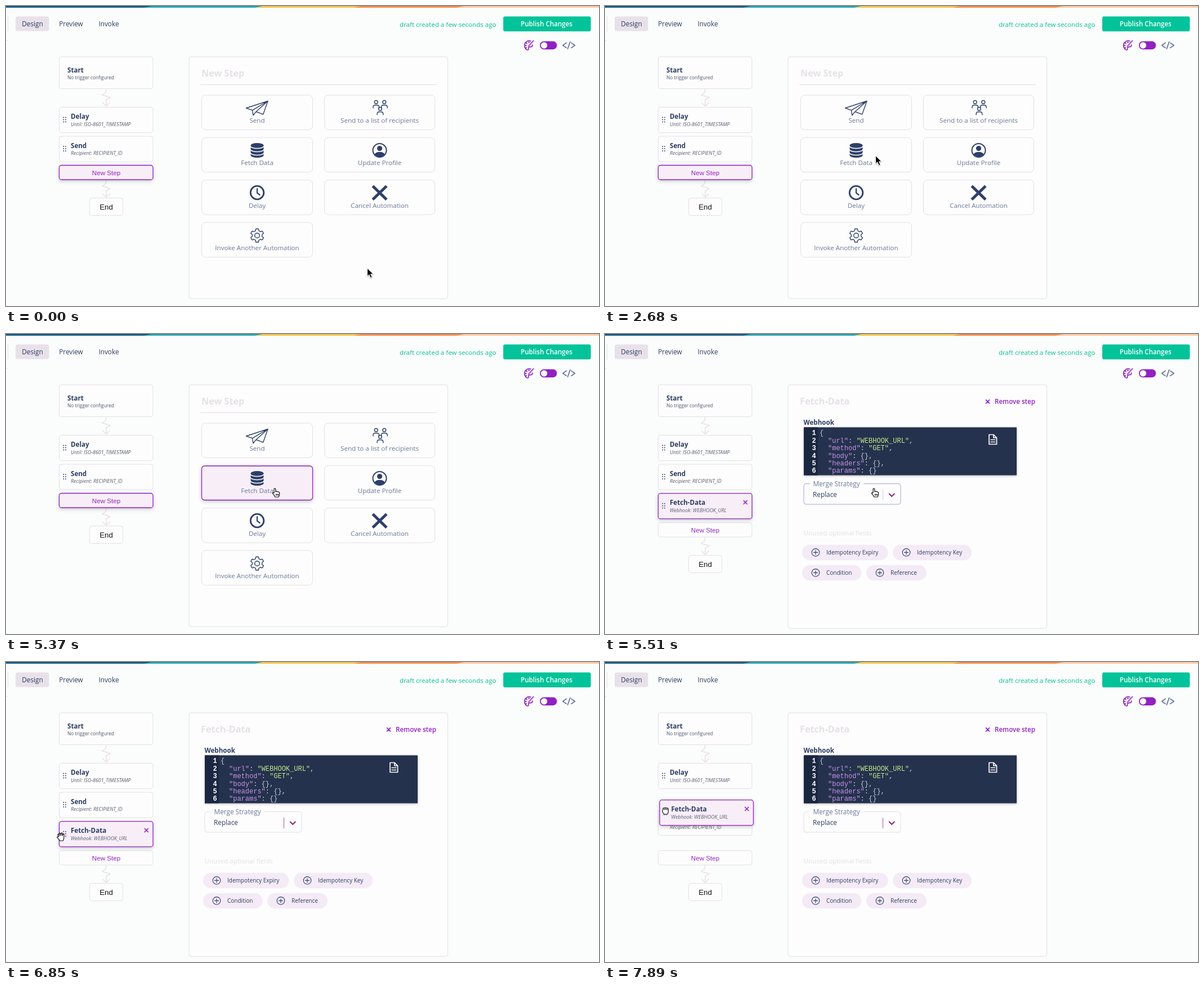
Animation, 1053 px wide and 532 px high, one loop 8000 ms. Source, as an HTML page:

```html
<!DOCTYPE html>
<html lang="en">
<head>
<meta charset="utf-8">
<title>Automation designer</title>
<style>
  html, body { margin: 0; width: 100%; height: 100%; overflow: hidden; background: #fbfdfc; }
  svg { display: block; width: 100%; height: 100%; }
  text { font: 11.6px "Open Sans", sans-serif; fill: #6b7898; white-space: pre; }
  .mid { text-anchor: middle; }
  .dark { fill: #2c3b60; }
  .tab { font-size: 11.8px; fill: #2c3b60; }
  .name { font-weight: 700; fill: #2c3b60; }
  .sub { font-size: 8.3px; fill: #4d5468; }
  .param { font-size: 8.9px; font-style: italic; fill: #5a5f70; }
  .title { font-size: 16.2px; font-weight: 700; fill: #e6e1e7; }
  .step { font-family: "Liberation Sans", sans-serif; fill: #9121c2; }
  .end { font: 13.3px "Liberation Sans", sans-serif; fill: #111; }
  .chip { font-size: 10px; fill: #2c3b60; }
  .code { font: 12px "Liberation Mono", monospace; fill: #c5cbdb; }
  .num { font-weight: 700; fill: #fff; text-anchor: end; }
  .key { fill: #c792ea; }
  .str { fill: #c3e88d; }
  .box { fill: #fdfdfd; stroke: #e2dfe4; }
  .active { fill: #f8eef8; stroke: #9121c2; stroke-width: 1.3; filter: drop-shadow(0 2px 3px #0003); }
  .line { fill: none; stroke: #2e3f69; stroke-width: 1.4; stroke-linejoin: round; stroke-linecap: round; }
  .solid { fill: #2e3f69; }
  .purple { fill: none; stroke: #9121c2; stroke-width: 1.7; stroke-linecap: round; }
  .pale { fill: none; stroke: #e9e0e7; stroke-width: 1.5; }
  .hand { fill: #fff; stroke: #111; stroke-width: 1.2; stroke-linejoin: round; }
</style>
</head>
<body>
<svg id="stage" viewBox="0 0 1053 532"></svg>
<script>
const LOOP = 8000;
const FORM_OPENS = 5510;

// Cursor poses: start time, shape, x, y of its top left corner
const cursorPath = [
  [0, 'arrow', 641.5, 465], [1500, 'arrow', 647.5, 461], [1650, 'arrow', 647, 461],
  [1940, 'arrow', 624, 438], [2090, 'arrow', 570, 373], [2240, 'arrow', 488, 281],
  [2390, 'arrow', 482, 270], [2530, 'arrow', 480.5, 267], [2680, 'arrow', 480.5, 265.5],
  [4480, 'point', 473, 272], [4770, 'point', 473, 273],
  [5810, 'point', 450, 278], [5960, 'arrow', 372, 295], [6110, 'grab', 238, 308],
  [6260, 'grab', 165, 306], [6400, 'grab', 150, 303],
  [6700, 'grab', 113, 302], [6850, 'grab', 90, 302], [7000, 'grab', 93, 302],
  [7150, 'hold', 97, 301], [7600, 'hold', 98, 292], [7745, 'hold', 99, 274], [7890, 'hold', 100.5, 257]
];
// Start time, dragged card dx, dy, pushed card dy
const dragPath = [[0, 0, 0, 0], [7600, 1, -6, 0], [7745, 2, -22, 8], [7890, 2.5, -38, 31.5]];
// Start time, highlight strength of the hovered tile
const hoverPath = [[0, 0], [4480, .4], [4625, .85], [4770, 1]];

const text = (x, y, content, cls = '') => `<text x="${x}" y="${y}" class="${cls}">${content}</text>`;
const rect = (x, y, w, h, r, cls = 'box', extra = '') =>
  `<rect x="${x}" y="${y}" width="${w}" height="${h}" rx="${r}" class="${cls}" ${extra}/>`;
const path = (d, cls = 'line', extra = '') => `<path d="${d}" class="${cls}" ${extra}/>`;
const circle = (x, y, r, cls = 'line', extra = '') => `<circle cx="${x}" cy="${y}" r="${r}" class="${cls}" ${extra}/>`;
const group = (id, content, dx = 0, dy = 0) => `<g id="${id}" transform="translate(${dx} ${dy})">${content}</g>`;
const cross = (x, y, r) => path(`M${x - r} ${y - r}l${2 * r} ${2 * r}m0 ${-2 * r}l${-2 * r} ${2 * r}`, 'purple');

function stepCard(y, name, param, cls) {
  let dots = '';
  for (const x of [102.3, 106])
    for (const dy of [18, 22, 26]) dots += circle(x, y + dy, .95, 'solid');
  return rect(94.5, y, 166.5, 45, 4, cls) + dots +
    text(115, y + 20.5, name, 'name') + text(115, y + 33, param, 'param');
}

const zigzag = y => path(`M177.5 ${y}v6l-6.5 5 14 4-7 4.5v11m-6.5-6l6.5 6 6.5-6`, 'pale');

const tail = (y, cls) => zigzag(y + 26) + rect(94.5, y, 166.5, 25.5, 4, cls) +
  text(178, y + 17.3, 'New Step', 'mid step') +
  rect(148.5, y + 58, 59, 31, 4) + text(178, y + 78.5, 'End', 'mid end');

function tile(col, row, label, icon) {
  const x = col ? 565.5 : 347.5, y = 158 + row * 75.3;
  return rect(x, y, col ? 196 : 197, 61.5, 7) + `<g>${icon}</g>` +
    text(col ? 663.5 : 446, y + 49, label, 'mid');
}

const person = (x, y) => circle(x, y, 2.9) + path(`M${x - 5.3} ${y + 10.5}v-1.5q0-3.6 3.6-3.6h3.4q3.6 0 3.6 3.6v1.5`);

function gear(cx, cy) {
  const points = [];
  for (let tooth = 0; tooth < 6; tooth++)
    for (const [deg, r] of [[-20, 8.8], [-11, 12], [11, 12], [20, 8.8]]) {
      const a = (tooth * 60 - 90 + deg) * Math.PI / 180;
      points.push(`${(cx + r * Math.cos(a)).toFixed(2)} ${(cy + r * Math.sin(a)).toFixed(2)}`);
    }
  return path(`M${points.join('L')}z`) + circle(cx, cy, 4.3);
}

const icons = {
  plane: path('M465 168.5L426.5 181l11 3.8 1.3 9 5.2-6.3 12.7 4.6zL437.5 184.8M465 168.5L444 187.5l-5.2 6.3'),
  people: person(657.2, 170.4) + person(671.8, 170.4) + person(664.4, 182.4),
  data: path('M434.5 247a11.5 4 0 0 1 23 0V265a11.5 4 0 0 1-23 0z', 'solid') +
    [248.3, 254.3, 260.3].map(y => path(`M434 ${y}a12 4.2 0 0 0 24 0`, '', 'fill="none" stroke="#fdfdfd" stroke-width="1.5"')).join(''),
  profile: circle(663.5, 256, 12, 'line', 'style="stroke-width:2"') + circle(663.5, 252.5, 4.6, 'solid') +
    path('M654.5 263q2.5-4.2 9-4.2t9 4.2a11.5 11.5 0 0 1-18 0z', 'solid'),
  clock: circle(446, 331, 11.8, 'line', 'style="stroke-width:2.8"') +
    path('M446 324v7.5l4.6 3.4', 'line', 'style="stroke-width:2.2"'),
  cancel: path('M653 321l21 20.5m0-20.5l-21 20.5', 'line', 'style="stroke-width:5;stroke-linecap:square"')
};

function header() {
  const bands = [[0, 260, '#1d5a82'], [245, 460, '#2ba6ab'], [442, 640, '#f2c553'], [617, 820, '#f28c4b'], [800, 1060, '#fdc9a4']];
  return bands.map(([a, b, color]) => path(`M${a} 3L${a + 14} 0H${b}V3z`, '', `fill="${color}"`)).join('') +
    path('M0 0h20v3H0z', '', 'fill="#1d5a82"') +
    path('M3.5 18V45M0 61.5h3', 'pale', 'style="stroke-width:1"') +
    rect(17, 18.5, 59.5, 26, 4, '', 'fill="#e9e1ea"') +
    text(47, 35.7, 'Design', 'mid tab') + text(115.5, 35.7, 'Preview', 'mid tab') + text(182.5, 35.7, 'Invoke', 'mid tab') +
    text(699, 36.5, 'draft created a few seconds ago', '" style="fill:#08bf8f') +
    rect(883, 18.5, 155.5, 26.5, 3, '', 'fill="#02c39a"') +
    text(960, 35.5, 'Publish Changes', 'mid" style="fill:#fff;font-weight:600') +
    path('M932 62.3A8.2 8.2 0 1 0 926 78q2.6 0 1.6-2.6-.7-2.6 2.4-2.8 4.6.3 5-3.4M928 71l8.6-9.5', 'purple') +
    [[923, 70], [924.5, 66], [928.5, 64.5], [923.6, 74]].map(([x, y]) => circle(x, y, 1.3, '', 'fill="#9121c2"')).join('') +
    rect(948, 62.5, 30.3, 14.5, 7.2, '', 'fill="#9121c2"') + circle(955.5, 69.8, 5.6, '', 'fill="#fff"') +
    path('M995 65.5l-6.2 4.3 6.2 4.3M1001.8 63.5l-4.4 12.5M1004 65.5l6.2 4.3-6.2 4.3', 'line', 'style="stroke:#69779a;stroke-width:1.8"');
}

function picker() {
  return rect(325, 90, 459.5, 429, 4) + text(347, 125, 'New Step', 'title') +
    path('M345 139.5H765', 'pale', 'style="stroke-width:1;stroke:#dfdce1"') +
    tile(0, 0, 'Send', icons.plane) + tile(1, 0, 'Send to a list of recipients', icons.people) +
    tile(0, 1, 'Fetch Data', icons.data) + tile(1, 1, 'Update Profile', icons.profile) +
    tile(0, 2, 'Delay', icons.clock) + tile(1, 2, 'Cancel Automation', icons.cancel) +
    tile(0, 3, 'Invoke Another Automation', gear(446, 407)) +
    group('hover', rect(347.5, 234, 197, 60.5, 5, 'active') + icons.data + text(446, 282.3, 'Fetch Data', 'mid'));
}

const chip = (x, y, w, label) => rect(x, y, w, 27.5, 13.7, '', 'fill="#f4ebf7"') +
  circle(x + 24, y + 13.7, 6.8, 'line', 'style="stroke-width:1.1"') +
  path(`M${x + 20.5} ${y + 13.7}h7m-3.5-3.5v7`, 'line', 'style="stroke-width:1.1"') +
  text(x + 43, y + 17.4, label, 'chip');

function form() {
  const key = s => `<tspan class="key">"${s}"</tspan>: `;
  const str = s => `<tspan class="str">"${s}"</tspan>`;
  const lines = ['{', key('url') + str('WEBHOOK_URL') + ',', key('method') + str('GET') + ',',
    key('body') + '{},', key('headers') + '{},', key('params') + '{}'];
  const code = lines.map((line, i) => text(374.8, 179.2 + i * 13.45, i + 1, 'code num') +
    text(i ? 396 : 381, 179.2 + i * 13.45, line, 'code')).join('');
  return rect(325, 90, 459.5, 432, 4) + text(346, 125, 'Fetch-Data', 'title') +
    cross(679.5, 119.8, 3) + text(692, 124, 'Remove step', '" style="fill:#9121c2;font-weight:600') +
    text(352.5, 160.5, 'Webhook', 'name') +
    rect(353, 165.5, 378, 85, 0, '', 'fill="#25324d" style="filter:drop-shadow(0 1px 2px #0004)"') +
    rect(353, 165.5, 25, 85, 0, '', 'fill="#1b2640"') + code +
    path('M682 178.5h8l5.5 5.5v11.5H682zM690 178.5v5.5h5.5M685 187.5h7.5M685 191.5h7.5', 'line', 'style="stroke:#fff;stroke-width:1.7"') +
    rect(353, 265.5, 172, 36.5, 4, 'box', 'id="select"') +
    rect(364, 262, 95, 7, 0, '', 'fill="#fdfdfd"') + text(369.5, 269.5, 'Merge Strategy', '" style="font-size:11.8px') +
    text(369, 288.5, 'Replace', 'tab') + path('M493.5 276V295', '', 'id="separator"') +
    path('M504.8 283.5l4.4 4.4 4.4-4.4', 'purple', 'style="stroke:#8f1a78;stroke-width:2"') +
    text(352.5, 357.2, 'Unused optional fields', '" style="fill:#e3dde4') +
    chip(350, 373.7, 152.5, 'Idempotency Expiry') + chip(511, 373.7, 140, 'Idempotency Key') +
    chip(350, 409.7, 105.5, 'Condition') + chip(464, 409.7, 107, 'Reference');
}

const cursors = {
  arrow: path('M0 0v14.3l3.3-3 2.5 5.8 2.7-1.1-2.5-5.6h4.6z', '', 'fill="#000" stroke="#fff" style="filter:drop-shadow(0 1px 1px #0005)"'),
  point: path('M3 9V2.2a1.4 1.4 0 0 1 2.8 0V6.5q1.5-1.2 2.6.2 1.6-.7 2.4.6 1.8-.4 1.8 1.4V11q0 3-1.8 5H5Q3.5 13 .8 10.2 0 8.4 1.6 8.4zM6.5 10.5v3M8.5 10.5v3M10.5 10.5v3', 'hand'),
  grab: path('M3.5 8L2 4.5q0-1.6 1.4-1.4L5 6 4.6 2.2q.9-1.6 2.2 0L7.4 5.6 8 1.6q1-1.3 2 0V6l1.4-3q1.3-.6 1.6.7L12.8 9q0 3-1.5 6H5.5Q4 12 1 9.6.4 8 2 7.6z', 'hand'),
  hold: path('M2.5 5V2.6q1-1.4 2.4-.4 1.2-1.4 2.4-.2 1.2-1 2.4.2 1.8-.4 2.2 1.4V8q-.3 3-1.6 5H4.6Q3 10.5 1.5 8.8V6q.2-1 1-1zM5 3v2.5M7.4 3v2.5M9.7 3v2.5', 'hand')
};

document.getElementById('stage').innerHTML = header() +
  rect(94.5, 90, 166.5, 56.5, 4) + text(109, 117.5, 'Start', 'name') + text(109, 129.8, 'No trigger configured', 'sub') +
  zigzag(147) + stepCard(179.5, 'Delay', 'Until: ISO-8601_TIMESTAMP') +
  group('pushed', stepCard(231, 'Send', 'Recipient: RECIPIENT_ID')) +
  group('before', tail(282.5, 'active') + picker()) +
  group('after', tail(334.5) + form() +
    group('dragged', stepCard(282.7, 'Fetch-Data', 'Webhook: WEBHOOK_URL', 'active') + cross(249.3, 298.5, 3))) +
  Object.entries(cursors).map(([id, shape]) => group(id, shape)).join('');

const el = id => document.getElementById(id);
const poseAt = (poses, t) => poses.findLast(pose => pose[0] <= t);
const show = (id, on) => { el(id).style.display = on ? '' : 'none'; };
const move = (id, x, y) => el(id).setAttribute('transform', `translate(${x} ${y})`);

function draw(t) {
  const open = t >= FORM_OPENS;
  show('before', !open);
  show('after', open);
  el('hover').style.opacity = poseAt(hoverPath, t)[1];

  const overSelect = t < 5960;
  el('select').style.stroke = overSelect ? '#a9a3d6' : '#e2dfe4';
  el('separator').style.stroke = overSelect ? '#d8d3e2' : '#a45a9c';

  const [, dx, dy, push] = poseAt(dragPath, t);
  move('dragged', dx, dy);
  move('pushed', 0, push);

  const [, shape, x, y] = poseAt(cursorPath, t);
  for (const id in cursors) show(id, id === shape);
  move(shape, x, y);
}

const start = performance.now();
function tick() {
  draw((performance.now() - start) % LOOP);
  requestAnimationFrame(tick);
}
tick();
</script>
</body>
</html>
```
